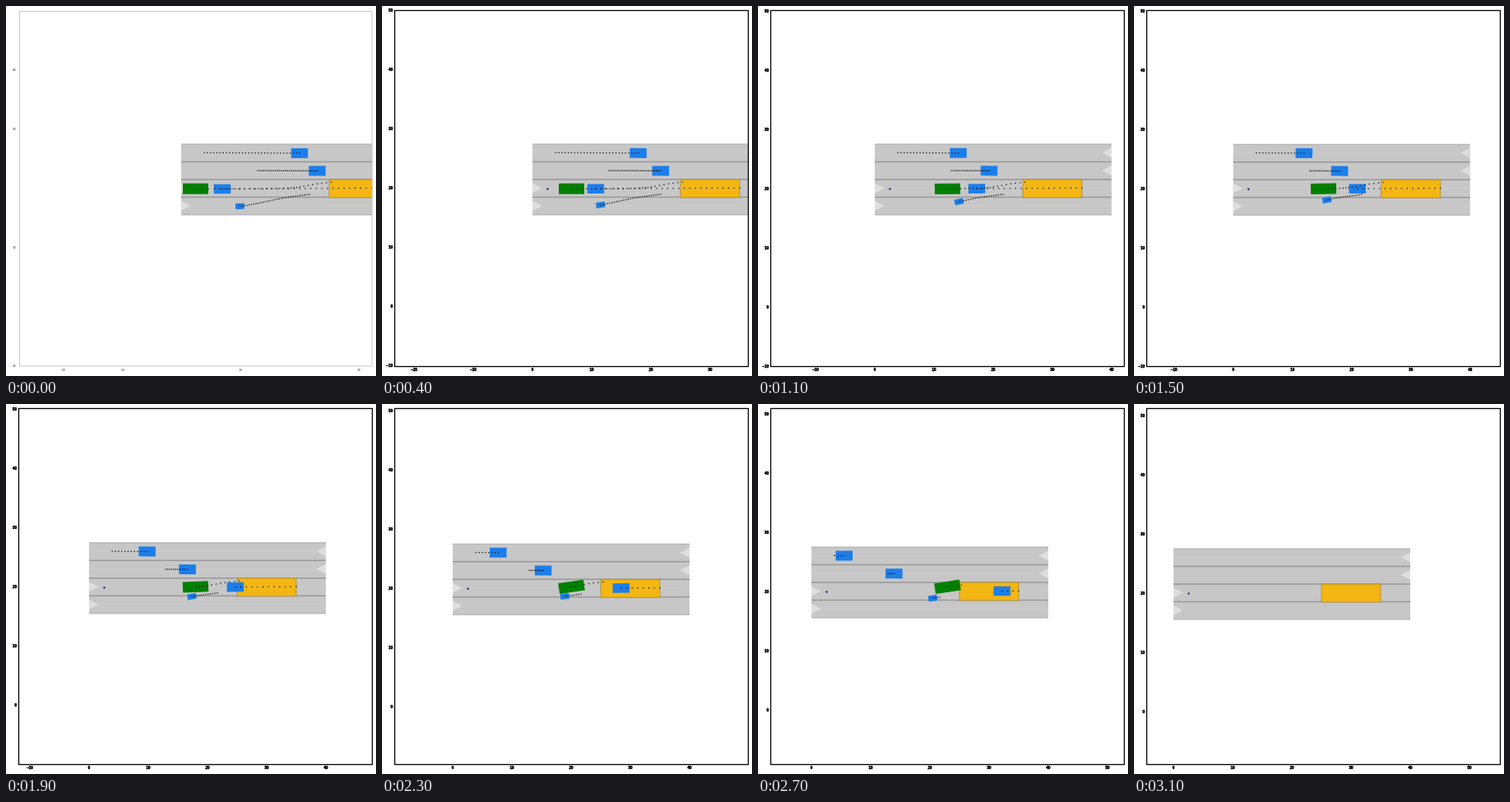
These frames come from a looping animation (450 by 450 pixels, 3.6 s). An HTML page with a canvas:

```html
<!DOCTYPE html>
<html lang="en">
<head>
<meta charset="utf-8">
<title>Traffic scenario</title>
<style>
  html, body { margin: 0; height: 100%; overflow: hidden; background: #fff; }
  canvas { display: block; width: 100vw; height: 100vh; }
</style>
</head>
<body>
<canvas id="stage" width="450" height="450"></canvas>
<script>
const ctx = document.getElementById('stage').getContext('2d');
const STEP = 100, LOOP = 3600, LAST = 30;
const TICK = 72, LANE = 21.5, ROAD = 288, ROAD_TOP = 168, BASE_Y = 222;
const VIEW = { x: 230.5, left: 15.5, right: 445.5, top: 5.5, bottom: 438.5 };

// Smooth curve through [step, value] knots.
function curve(knots) {
  const slope = (i, j) => (knots[j][1] - knots[i][1]) / (knots[j][0] - knots[i][0]);
  const tangent = i => slope(Math.max(0, i - 1), Math.min(knots.length - 1, i + 1));
  return t => {
    let i = 0;
    while (i < knots.length - 2 && t > knots[i + 1][0]) i++;
    const [t0, a] = knots[i], [t1, b] = knots[i + 1];
    const d = t1 - t0, u = (t - t0) / d, v = 1 - u;
    return a * v * v * (1 + 2 * u) + b * u * u * (3 - 2 * u)
      + d * u * v * (v * tangent(i) - u * tangent(i + 1));
  };
}
const line = (start, end) => t => start + (end - start) * t / LAST;

// Positions are relative to the left road end, before the vertical camera shift.
const ego = {
  w: 31, h: 13, color: '#008000',
  x: curve([[0, 17.5], [4, 47.5], [11, 88.5], [19, 129.5], [23, 144.5], [27, 165.5], [30, 182.5]]),
  y: curve([[0, 222.3], [11, 222.3], [19, 221.5], [23, 220.1], [27, 216.3], [30, 214.3]])
};
const cars = [
  { w: 20.5, h: 12, x: line(144, 28.2), y: line(179, 178.4) },
  { w: 20.5, h: 12, x: line(165.5, 93.2), y: line(200.5, 200.2) },
  { w: 20.5, h: 11.5, x: line(50, 252), y: line(222.5, 221.4) },
  { w: 10.8, h: 7, x: line(71.5, 156),
    y: curve([[-12, 243.5], [0, 243.5], [4, 242], [11, 238], [19, 233.3], [23, 231.7], [27, 230.2], [30, 229]]) }
].map(car => ({ color: '#1c7eea', ...car }));
const vehicles = [ego, ...cars];

function heading({ x, y }, t) {
  const a = Math.max(0, t - 0.1), b = Math.min(LAST, t + 0.1);
  return Math.atan2(y(b) - y(a), x(b) - x(a));
}

function rect(color, x, y, w, h) {
  ctx.fillStyle = color;
  ctx.fillRect(x, y, w, h);
}

function arrow(x, y, length) {
  ctx.fillStyle = '#dedede';
  ctx.beginPath();
  ctx.moveTo(x, y - 6);
  ctx.lineTo(x + length, y);
  ctx.lineTo(x, y + 6);
  ctx.fill();
}

function drawRoad() {
  rect('#c7c7c7', 0, ROAD_TOP, ROAD, 4 * LANE);
  for (let lane = 0; lane < 4; lane++) {
    const middle = ROAD_TOP + (lane + 0.5) * LANE - 0.3;
    rect('#cccccc', 0, middle - 0.4, ROAD, 0.8);
    if (lane < 2) arrow(ROAD, middle, -11.5);
    else arrow(0, middle, 11.5);
  }
  for (let i = 0; i <= 4; i++) {
    const inner = i % 4 > 0;
    const weight = inner ? 1.5 : 1;
    rect(inner ? '#989898' : '#ababab', 0, ROAD_TOP + i * LANE - weight / 2, ROAD, weight);
  }
  rect('#f3b613', 180, 211, 72, 22);
  ctx.strokeStyle = '#aa8932';
  ctx.lineWidth = 0.8;
  ctx.strokeRect(180, 211, 72, 22);
  rect('#000080', 17.5, BASE_Y - 0.5, 2, 2);
}

function drawVehicle(vehicle, t) {
  const { w, h, color } = vehicle;
  const angle = heading(vehicle, t);
  ctx.save();
  ctx.translate(vehicle.x(t), vehicle.y(t));
  ctx.rotate(Math.cos(angle) < 0 ? angle + Math.PI : angle);
  rect(color, -w / 2, -h / 2, w, h);
  ctx.restore();
}

function drawAxes(roadX, shift, faint) {
  ctx.strokeStyle = faint ? '#c4c4c4' : '#000';
  ctx.lineWidth = faint ? 0.9 : 1.3;
  const { left, right, top, bottom } = VIEW;
  const inset = faint ? 1 : 0;
  ctx.strokeRect(left + inset, top + inset, right - left - 1.5 * inset, bottom - top - 1.5 * inset);

  ctx.font = `${faint ? '3px' : 'bold 4.5px'} "Liberation Sans", sans-serif`;
  ctx.fillStyle = ctx.strokeStyle = '#000';
  ctx.lineWidth = 0.5;
  ctx.textBaseline = 'middle';
  const label = (value, x, y, align) => {
    if (faint && [0, 20, 50].includes(value)) return;
    const text = String(value).replace('-', '\u2212');
    ctx.textAlign = align;
    ctx.fillText(text, x, y);
    if (!faint) ctx.strokeText(text, x, y);
  };
  for (let i = -3; i <= 6; i++) {
    const x = roadX + i * TICK, y = BASE_Y + shift - (i - 2) * TICK;
    if (x >= left && x <= right) label(i * 10, x, 442.7, 'center');
    if (y >= top && y <= bottom) label(i * 10, faint ? 11.5 : 13, y + 0.3, 'right');
  }
}

function draw(step) {
  const t = Math.min(step, LAST);
  const roadX = VIEW.x - ego.x(t), shift = ego.y(0) - ego.y(t);
  rect('#fff', 0, 0, 450, 450);
  ctx.save();
  ctx.beginPath();
  ctx.rect(VIEW.left, VIEW.top, VIEW.right - VIEW.left, VIEW.bottom - VIEW.top);
  ctx.clip();
  ctx.translate(roadX, shift);
  drawRoad();
  if (step <= LAST) {
    [...cars, ego].forEach(vehicle => drawVehicle(vehicle, t));
    for (const { x, y } of vehicles)
      for (let i = t; i <= LAST; i++) rect('#111', x(i) - 0.65, y(i) - 0.65, 1.3, 1.3);
  }
  ctx.restore();
  drawAxes(roadX, shift, step === 0);
}

const start = performance.now();
function tick() {
  const time = (performance.now() - start) % LOOP;
  draw(Math.min(Math.floor(time / STEP), LAST + 1));
  requestAnimationFrame(tick);
}
tick();
</script>
</body>
</html>
```
